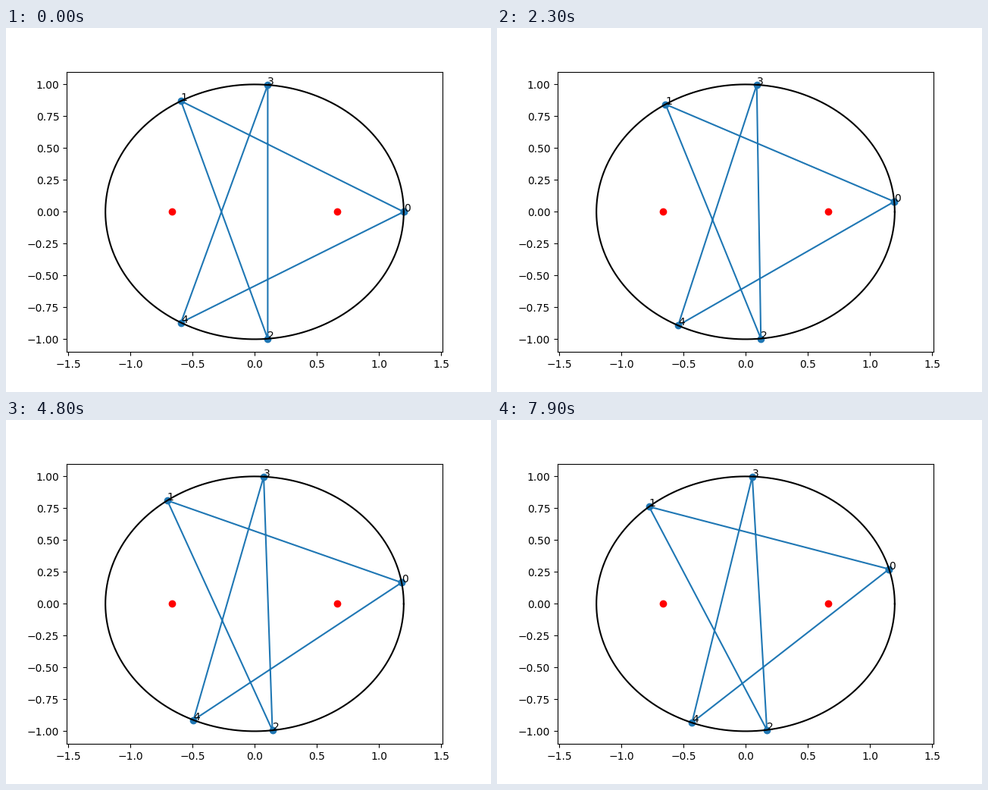
A matplotlib script that plays this animation: 640 px wide and 480 px high, repeating every 8 s.

```python
import numpy as np
import matplotlib.pyplot as plt
from matplotlib.animation import FuncAnimation

A, B = 1.2, 1.0
FRAMES, INTERVAL = 80, 100
STEP = 2 * np.pi / 1800


def point(t):
    return np.stack([A * np.cos(t), B * np.sin(t)], axis=-1)


def tangent(t):
    return np.stack([-A * np.sin(t), B * np.cos(t)], axis=-1)


def equilateral(t, rounds=12):
    """Newton search for five equal chords, keeping the first angle fixed."""
    t = t.copy()
    for _ in range(rounds):
        p, v = point(t), tangent(t)
        chord = np.roll(p, -1, axis=0) - p
        sq = (chord ** 2).sum(axis=1)
        jac = np.zeros((5, 5))
        for i in range(5):
            j = (i + 1) % 5
            jac[i, i] = -2 * chord[i] @ v[i]
            jac[i, j] = 2 * chord[i] @ v[j]
        t[1:] -= np.linalg.solve(np.diff(jac, axis=0)[:, 1:], np.diff(sq))
    return t


def orbit():
    t = np.radians([0, 119.6, -84.94, 84.94, -119.6])
    stars = []
    for k in range(FRAMES):
        t[0] = k * STEP
        t = equilateral(t)
        stars.append(point(t))
    return stars


stars = orbit()

fig, ax = plt.subplots(figsize=(6.4, 4.8), dpi=100)
ax.set_xlim(-1.05 * A ** 2, 1.05 * A ** 2)
ax.set_ylim(-1.1 * B, 1.1 * B)

ellipse = point(np.linspace(0, 2 * np.pi, 400))
focus = np.sqrt(A ** 2 - B ** 2)
star, = ax.plot([], [], "o-", color="C0")
ax.plot(*ellipse.T, color="black")
ax.plot([-focus, focus], [0, 0], "o", color="red")
labels = [ax.text(0, 0, str(i)) for i in range(5)]


def update(k):
    p = stars[k]
    star.set_data(*np.vstack([p, p[:1]]).T)
    for label, xy in zip(labels, p):
        label.set_position(xy)
    return [star, *labels]


anim = FuncAnimation(fig, update, frames=FRAMES, interval=INTERVAL,
                     repeat=True, repeat_delay=0)
plt.show()
```
